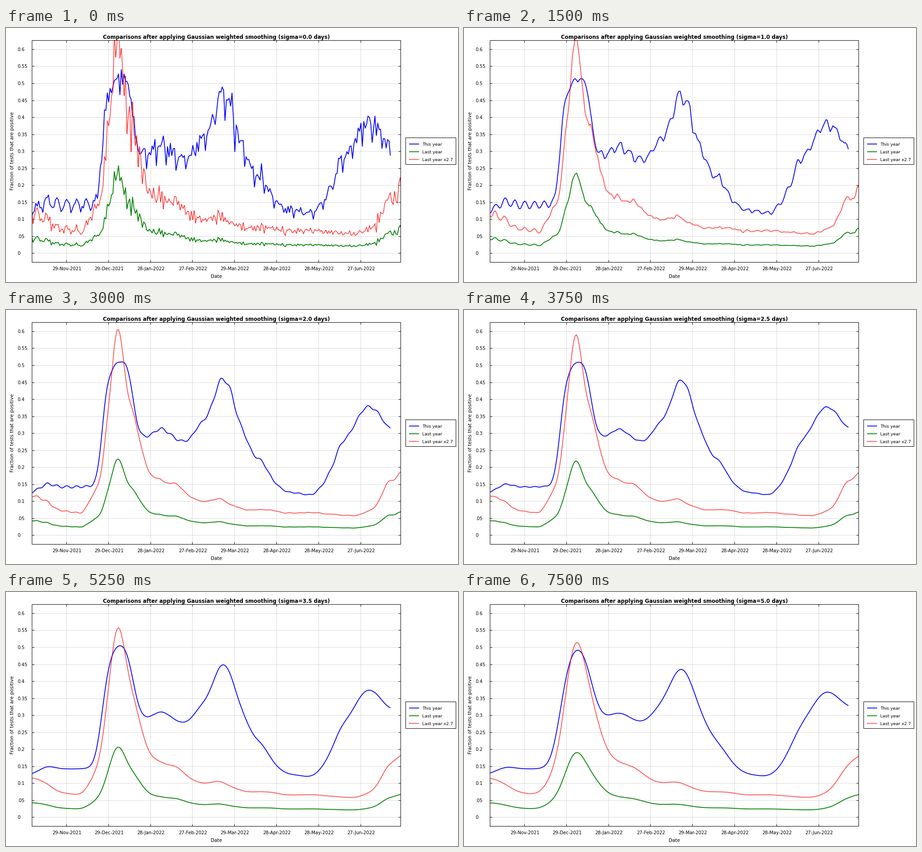
Animation, 998 px wide and 561 px high, one loop 8 s. Source, as a matplotlib script:

```python
import numpy as np
import matplotlib.pyplot as plt
from matplotlib.animation import FuncAnimation
from matplotlib.patches import Rectangle

W, H, DPI = 998, 561, 64
PX = 72 / DPI                                # points per pixel
LEFT, RIGHT, TOP, BOTTOM = 57.5, 871.5, 27.5, 517.5
PAD = 20                                     # days kept outside the view
BLUE, GREEN, RED = "#0000ff", "#008000", "#ff0000"

plt.rcParams["font.family"] = "DejaVu Sans"
rng = np.random.default_rng(4)

# Turning points of each trend: day, fraction of tests.
THIS_YEAR = [
    (0, .125), (11, .153), (21, .142), (42, .143), (47, .170), (49, .235),
    (53, .445), (57, .490), (67, .525), (70, .468), (76, .298), (82, .288),
    (93, .319), (103, .281), (111, .276), (128, .368), (134, .466), (138, .460),
    (143, .425), (146, .355), (159, .228), (164, .225), (173, .155), (181, .129),
    (200, .117), (208, .148), (215, .205), (220, .268), (227, .297), (234, .355),
    (239, .385), (248, .362), (256, .297)]
LAST_YEAR = [
    (0, .118), (11, .102), (18, .074), (37, .064), (46, .143), (49, .145),
    (52, .264), (56, .425), (60, .610), (62, .655), (64, .600), (67, .425),
    (71, .395), (77, .280), (83, .183), (95, .155), (104, .152), (112, .115),
    (121, .099), (130, .102), (135, .113), (140, .093), (154, .073), (168, .076),
    (182, .065), (200, .067), (216, .061), (232, .057), (246, .082), (255, .170),
    (259, .155), (263, .190)]


def series(trend, last_day, swing, weekly, noise):
    """Trend with a weekly rhythm that changes shape after the winter peak."""
    day = np.arange(-PAD, last_day + 1)
    early = swing * np.cos(2 * np.pi * (day - 4) / 7)
    rhythm = np.where(day < 44, early, np.where(day < 77, 0, weekly[day % 7]))
    jitter = noise * np.diff(rng.normal(size=day.size + 1))
    return day, np.interp(day, *zip(*trend)) * (1 + rhythm + jitter)


def smooth(y, sigma):
    if sigma == 0:
        return y
    i = np.arange(y.size)
    w = np.exp(-((i[:, None] - i) / sigma) ** 2 / 2)
    return w @ y / w.sum(axis=1)


def x_of(day):
    return 56.6 + 3.094 * day


def y_of(value):
    return 497.5 - 750 * value


fig = plt.figure(figsize=(W / DPI, H / DPI), dpi=DPI, facecolor="white")
ax = fig.add_axes([0, 0, 1, 1])
ax.set_xlim(0, W)
ax.set_ylim(H, 0)
ax.axis("off")


def line(x, y, color="black", width=1, dash=None, **kw):
    style = (0, [d / width for d in dash]) if dash else "-"
    return ax.plot(x, y, color=color, lw=width * PX, ls=style, snap=False,
                   dash_capstyle="butt", solid_capstyle="butt", **kw)[0]


def text(x, y, s, size, **kw):
    return ax.text(x, y, s, fontsize=size * PX, **kw)


def box(x0, y0, x1, y1, **kw):
    return ax.add_patch(Rectangle((x0, y0), x1 - x0, y1 - y0, lw=PX,
                                  ec="black", snap=False, **kw))


GRID = dict(color="#909090", dash=(1, 2), zorder=1)
DATES = ["29-Nov-2021", "29-Dec-2021", "28-Jan-2022", "27-Feb-2022",
         "29-Mar-2022", "28-Apr-2022", "28-May-2022", "27-Jun-2022"]
for k, date in enumerate(DATES):
    x = int(133.5 + 92.8 * k) + .5
    line([x, x], [BOTTOM, TOP], **GRID)
    line([x, x], [TOP, TOP + 5], zorder=4)
    line([x, x], [BOTTOM - 5, BOTTOM], zorder=4)
    text(x + .8, 535.2, date, 10, ha="center")

for k in range(13):
    y = int(y_of(k / 20)) + .5
    line([LEFT, RIGHT], [y, y], **GRID)
    line([LEFT, LEFT + 5], [y, y], zorder=4)
    line([RIGHT - 5, RIGHT], [y, y], zorder=4)
    text(25.5, y + 3.8, ".05" if k == 1 else f"{k / 20:g}", 10)

box(LEFT, TOP, RIGHT, BOTTOM, fill=False, zorder=5)
text(464.5, 552.5, "Date", 10.4, ha="center")
text(14.5, 271, "Fraction of tests that are positive", 10.4,
     rotation=90, ha="center", va="center")
title = text(465, 23.5, "", 11.62, weight="bold", ha="center")

STYLES = [("This year", BLUE, None),
          ("Last year", GREEN, None),
          ("Last year x2.7", RED, (2, 1))]
box(882.5, 242.5, 993.5, 301.5, fc="white", zorder=2)
clip = Rectangle((LEFT - .5, TOP - .5), RIGHT - LEFT + 1, BOTTOM - TOP + 1,
                 transform=ax.transData)
curves = []
for k, (name, color, dash) in enumerate(STYLES):
    y = 256.3 + 17 * k
    line([890, 912], [y, y], color, 1.8, dash, zorder=3)
    text(919, y + 3.7, name, 9.45, zorder=3)
    curve = line([], [], color, 1.8, dash, zorder=3)
    curve.set_clip_path(clip)
    curves.append(curve)

# Reports drop sharply on one day of each week.
WEEK = np.array([0, .01, .03, .06, .03, -.13, 0])
days_now, now = series(THIS_YEAR, 256, .11, WEEK, .025)
days_past, past = series(LAST_YEAR, 263 + PAD, .12, WEEK / 2, .06)


def draw(frame):
    sigma = frame // 3 / 2
    a, b = smooth(now, sigma), smooth(past, sigma) / 2.7
    for curve, day, y in zip(curves, (days_now, days_past, days_past), (a, b, 2.7 * b)):
        curve.set_data(x_of(day), y_of(y))
    title.set_text("Comparisons after applying Gaussian weighted smoothing "
                   f"(sigma={sigma:.1f} days)")
    return [*curves, title]


anim = FuncAnimation(fig, draw, frames=32, interval=250, repeat=True,
                     repeat_delay=0, blit=False)
plt.show()
```
